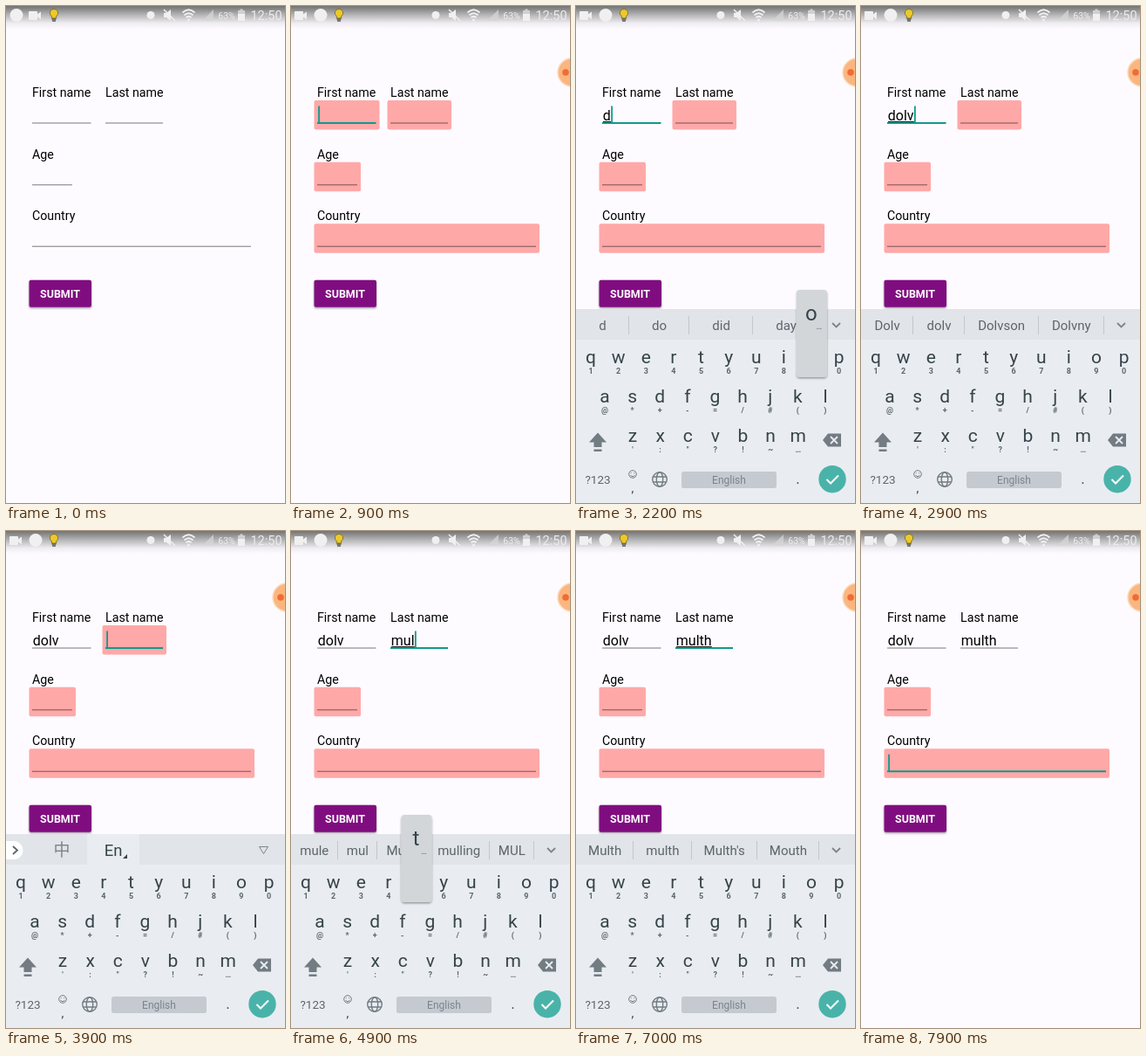
Animation of 320x569 px, one loop 8 s. Source, as an HTML page:

```html
<!DOCTYPE html>
<html lang="en">
<head>
<meta charset="utf-8">
<title>Form validation</title>
<style>
  html, body { margin: 0; width: 100%; height: 100%; overflow: hidden; background: #fdfbff; }
  body, text { font-family: Roboto, "Noto Sans CJK SC", "Noto Sans CJK", sans-serif; }
  #stage { position: relative; width: 320px; height: 569px; overflow: hidden; }
  svg { position: absolute; left: 0; top: 0; }
  #keyboard { position: absolute; inset: 0; }
  #words { position: absolute; left: 0; top: 347px; width: 279px; height: 35px; display: flex;
    font-size: 15px; line-height: 38px; color: #5c656b; }
  #words span { flex: 1 1 auto; text-align: center; position: relative; }
  #words span::after { content: ""; position: absolute; right: 0; top: 8px; width: 1px; height: 21px; background: #c3c8cd; }
</style>
</head>
<body>
<div id="stage">
  <svg id="app" width="320" height="569">
    <defs>
      <linearGradient id="shade" x2="0" y2="1">
        <stop offset="0" stop-color="#737373"/>
        <stop offset=".4" stop-color="#b6b5b7"/>
        <stop offset=".75" stop-color="#eeecf0"/>
        <stop offset="1" stop-color="#fdfbff"/>
      </linearGradient>
      <filter id="drop" x="-20%" y="-20%" width="140%" height="150%">
        <feDropShadow dx="0" dy="1.3" stdDeviation="1.2" flood-opacity=".4"/>
      </filter>
    </defs>
    <rect width="320" height="26" fill="url(#shade)"/>
    <g fill="#f0f0f0">
      <circle id="badge" cy="10.5" r="7.5"/>
      <path id="camera" d="M-6 6h8q1 0 1 1v2.500l4-3v9l-4-3v2.500q0 1-1 1h-8q-1 0-1-1v-8q0-1 1-1z"/>
      <path d="M55 3.500a4.500 4.500 0 0 1 2.700 8.200v2.300h-5.400v-2.300a4.500 4.500 0 0 1 2.700-8.200z" fill="#ecc929" stroke="#6d6123" stroke-width=".8"/>
      <path d="M52.500 15h5M53 17h4" stroke="#5b5746" stroke-width="1.500"/>
      <circle cx="166" cy="10.500" r="4.500"/>
      <path d="M181 8h3l5-4v13l-5-4h-3z"/>
      <path d="M181 4l13 13" stroke="#f0f0f0" stroke-width="1.500"/>
      <path d="M202.500 7.500q7-6.500 14 0M204.500 10.500q5-4.500 10 0M206.500 13.300q3-2.500 6 0" fill="none" stroke="#f0f0f0" stroke-width="1.800"/>
      <circle cx="209.500" cy="16" r="1.500"/>
      <path d="M238 4v13h-13z" fill="#d6d6d6" opacity=".75"/>
      <path d="M266 5h2.500V3.500h3V5h2.500v4h-8z" fill="#d0d0d0"/>
      <path d="M266 9h8v8h-8z"/>
    </g>
    <g id="form"></g>
    <g id="bubble">
      <circle cx="322" cy="76" r="16" fill="#fbb67f" stroke="#fdd9bd" stroke-width="1.500"/>
      <circle cx="315" cy="76" r="3.800" fill="#f06c35"/>
    </g>
  </svg>
  <div id="keyboard">
    <svg width="320" height="569">
      <rect y="347" width="320" height="222" fill="#e9edf1"/>
      <rect y="347" width="320" height="35" fill="#e1e4e8"/>
      <g id="keys"></g>
      <g id="languages">
        <rect x="93" y="347" width="60" height="35" fill="#e9edf1"/>
        <path d="M0 355h9a10 10 0 0 1 0 21h-9z" fill="#fff"/>
        <path d="M8 361l5 4.500-5 4.500" fill="none" stroke="#59646a" stroke-width="1.800"/>
        <path d="M139 370v5h-5z" fill="#37474f"/>
        <path d="M290.500 361.500h10l-5 8z" fill="none" stroke="#7b868b"/>
      </g>
      <path id="more" d="M294 363l4.500 4.500 4.500-4.500" fill="none" stroke="#7b868b" stroke-width="1.800"/>
      <g fill="#727c82">
        <path d="M25 488.500l10 11h-5.500v5.500h-9v-5.500h-5.500zM20.500 507.500h9v2.500h-9z"/>
        <path d="M283 497l6-7.500h15v15h-15z"/>
        <path d="M292 493l8 8m0-8l-8 8" stroke="#e9edf1" stroke-width="1.800"/>
      </g>
      <g fill="none" stroke="#727c82">
        <circle cx="65" cy="536" r="4.300"/>
        <path d="M62.500 537.500q2.500 2.500 5 0M63.200 534.200v1M66.800 534.200v1"/>
        <g stroke-width="1.400">
          <circle cx="96" cy="542" r="8.300"/><ellipse cx="96" cy="542" rx="3.700" ry="8.300"/>
          <path d="M88.500 539h15M88.500 545h15"/>
        </g>
      </g>
      <rect x="121" y="533" width="109" height="19" rx="2.500" fill="#c5cad0"/>
      <circle cx="294" cy="541.700" r="15.700" fill="#4ab3a9"/>
      <path d="M287.500 542l4.500 4.500 9-9" fill="none" stroke="#fff" stroke-width="2"/>
      <g id="captions"></g>
    </svg>
    <div id="words"></div>
  </div>
  <svg width="320" height="569">
    <g id="popup">
      <rect x="-17" y="-77" width="35" height="100" rx="4" fill="#d2d6d9" filter="url(#drop)"/>
    </g>
  </svg>
</div>
<script>
const $ = id => document.getElementById(id);
const LOOP = 8000, BLINK = 500, HOLD = 170;
const TEAL = '#109a8c', INK = '#37434a', GREY = '#5c656b';

function add(parent, tag, attrs, content) {
  const el = document.createElementNS('http://www.w3.org/2000/svg', tag);
  for (const k in attrs) el.setAttribute(k, attrs[k]);
  if (content) el.textContent = content;
  parent.append(el);
  return el;
}
const label = (parent, x, y, content, size, fill, extra = {}) =>
  add(parent, 'text', { x, y, 'font-size': size, fill, 'text-anchor': 'middle', ...extra }, content);
const show = (el, on) => el.style.display = on ? '' : 'none';

// x, width and y describe the underline
function makeField(x, width, y, name) {
  const form = $('form');
  label(form, x, y - 29.300, name, 14.220, '#000', { 'text-anchor': 'start' });
  return {
    x, y,
    error: add(form, 'rect', { x: x - 3.500, y: y - 25.500, width: width + 7.500, height: 33.500, rx: 2, fill: '#ffa8a8' }),
    line: add(form, 'rect', { x, width }),
    text: label(form, x + .8, y - 2.500, '', 16, '#000', { 'text-anchor': 'start' }),
    under: add(form, 'rect', { x: x + 1, y: y - 1.500, height: 1, fill: '#222' }),
    caret: add(form, 'rect', { y: y - 19, width: 1.800, height: 19, fill: TEAL })
  };
}
const fields = {
  first: makeField(30, 67.500, 133.500, 'First name'),
  last: makeField(114, 66, 133.500, 'Last name'),
  age: makeField(30, 46, 204.300, 'Age'),
  country: makeField(30, 251, 274.700, 'Country')
};
const button = add($('form'), 'rect', { x: 26.500, y: 313.700, width: 71.500, height: 31, rx: 2, filter: 'url(#drop)' });
label($('form'), 62, 334.200, 'SUBMIT', 12.440, '#fff', { 'font-weight': 700 });
label($('app'), 253, 14.500, '63%', 10.500, '#ececec');
label($('app'), 298.500, 16, '12:50', 14.500, '#ececec');

// Keyboard
const rows = [
  ['qwertyuiop', '1234567890', 17, 402],
  ['asdfghjkl', '@*+-=/#()', 33, 447],
  ['zxcvbnm', '\':"?!~…', 65, 492]
];
const keyMap = {};
for (const [letters, hints, x0, y] of rows) {
  [...letters].forEach((c, i) => {
    const x = x0 + 31.620 * i;
    keyMap[c] = { x, y };
    label($('keys'), x, y + 7, c, 21, INK);
    label($('keys'), x, y + 18.500, hints[i], 9, GREY, { 'font-weight': 700 });
  });
}
label($('captions'), 25, 547, '?123', 13.500, GREY);
label($('captions'), 65, 557, ',', 14, INK);
label($('captions'), 175.500, 547, 'English', 12, '#7b858b');
label($('captions'), 254.500, 547, '.', 17, INK);
label($('languages'), 64, 372, '中', 19, '#7b858b');
label($('languages'), 123, 372, 'En', 18.500, INK);
const popLetter = label($('popup'), 0, -42.500, '', 24, INK);
label($('popup'), 9, -32, '…', 10, GREY);

// Timeline
const focusSteps = [[900, 'first'], [3600, 'last'], [7900, 'country']];
const slides = [[1000, 1300, 1], [3300, 3500, 0], [3600, 3900, 1], [7250, 7500, 0]];
const typing = [
  ['first', 'd', 1900], ['first', 'o', 2130], ['first', 'l', 2370], ['first', 'v', 2600],
  ['last', 'm', 4300], ['last', 'u', 4500], ['last', 'l', 4680], ['last', 't', 4870], ['last', 'h', 5080]
];
const guesses = {
  d: 'd,do,did,day', do: 'do,Do,don\'t,does', dol: 'doll,dol,dollar,DOL', dolv: 'Dolv,dolv,Dolvson,Dolvny',
  m: 'm,my,me,more', mu: 'mu,much,must,music', mul: 'mule,mul,Multh,mulling,MUL',
  mult: 'multi,mult,Multh,multiple', multh: 'Multh,multh,Multh\'s,Mouth'
};

function keyboardLevel(t) {
  let level = 0;
  for (const [from, to, goal] of slides) {
    if (t < from) break;
    const p = Math.min(1, (t - from) / (to - from));
    const eased = 1 - (1 - p) ** 2;
    level = goal ? eased : 1 - eased;
  }
  return level;
}

let shownWords = null;
function setWords(text) {
  if (text === shownWords) return;
  shownWords = text;
  $('words').replaceChildren(...(text ? guesses[text].split(',') : []).map(word => {
    const span = document.createElement('span');
    span.textContent = word;
    return span;
  }));
  show($('languages'), !text);
  show($('more'), text);
}

function render(t) {
  const started = t >= 100;
  $('badge').setAttribute('cx', started ? 34 : 12);
  $('camera').setAttribute('transform', `translate(${started ? 11 : 33} 0)`);
  show($('bubble'), started);
  button.setAttribute('fill', started && t < 400 ? '#912a91' : '#801080');

  const [since, focus] = focusSteps.filter(s => t >= s[0]).pop() || [0, ''];
  const typed = typing.filter(k => t >= k[2] + HOLD);
  const lastEvent = Math.max(since, ...typed.map(k => k[2] + HOLD));
  const caretOn = Math.floor((t - lastEvent) / BLINK) % 2 === 0;

  for (const name in fields) {
    const f = fields[name], active = name === focus;
    const value = typed.filter(k => k[0] === name).map(k => k[1]).join('');
    f.text.textContent = value;
    const width = value ? f.text.getComputedTextLength() : 0;
    const committed = name === 'first' ? 3300 : 7250;
    f.under.setAttribute('width', t < committed ? width : 0);
    f.caret.setAttribute('x', f.x + 1.200 + width);
    show(f.caret, active && caretOn);
    show(f.error, t >= 300 && !value);
    f.line.setAttribute('y', f.y - (active ? .5 : 0));
    f.line.setAttribute('height', active ? 2 : 1);
    f.line.setAttribute('fill', active ? TEAL : 'rgba(0, 0, 0, .52)');
    if (active) setWords(value);
  }
  if (!focus) setWords('');

  const level = keyboardLevel(t);
  $('keyboard').style.opacity = level;
  $('keyboard').style.transform = `translateY(${(1 - level) * 45}px)`;

  const press = typing.find(k => t >= k[2] && t < k[2] + HOLD);
  show($('popup'), press);
  if (press) {
    const { x, y } = keyMap[press[1]];
    $('popup').setAttribute('transform', `translate(${x} ${y})`);
    popLetter.textContent = press[1];
  }
}

function tick() {
  render(performance.now() % LOOP);
  requestAnimationFrame(tick);
}
tick();
</script>
</body>
</html>
```
